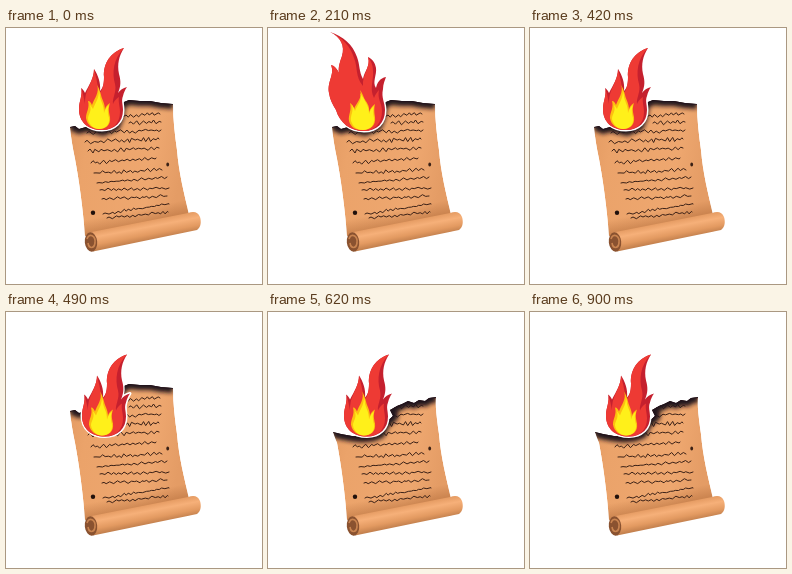
These frames come from a looping animation (256x256 px, 1.04 s). An HTML page:

```html
<!DOCTYPE html>
<html lang="en">
<head>
<meta charset="utf-8">
<title>Burning scroll</title>
<style>
html, body { margin: 0; width: 100%; height: 100%; overflow: hidden; background: #fff; }
svg { display: block; width: 100vw; height: 100vh; }
.ink { fill: none; stroke: #3a2016; stroke-width: 1; stroke-linecap: round; stroke-linejoin: round; }
.char { fill: none; stroke: #21131c; stroke-linejoin: round; }
.back { fill: #c5202e; stroke: #fff; stroke-width: 3; paint-order: stroke; stroke-linejoin: round; }
.front { fill: #ee3a34; }
.amber { fill: #fdc010; }
.yellow { fill: #fff01a; }
</style>
</head>
<body>
<svg viewBox="0 0 256 256">
  <defs>
    <linearGradient id="sheet" x1="0" y1="0" x2="1" y2="0.2">
      <stop offset="0" stop-color="#e39a62"/>
      <stop offset="0.2" stop-color="#eba36a"/>
      <stop offset="0.75" stop-color="#eea76f"/>
      <stop offset="1" stop-color="#e49c65"/>
    </linearGradient>
    <linearGradient id="roll" gradientUnits="userSpaceOnUse" x1="134" y1="194" x2="138" y2="215">
      <stop offset="0" stop-color="#e59b62"/>
      <stop offset="0.3" stop-color="#f6b079"/>
      <stop offset="0.65" stop-color="#e39a61"/>
      <stop offset="1" stop-color="#b97847"/>
    </linearGradient>
    <linearGradient id="fold" gradientUnits="userSpaceOnUse" x1="128" y1="182" x2="131" y2="197">
      <stop offset="0" stop-color="#b06a38" stop-opacity="0"/>
      <stop offset="1" stop-color="#b06a38" stop-opacity="0.55"/>
    </linearGradient>
    <filter id="soft" x="-20%" y="-60%" width="140%" height="220%"><feGaussianBlur stdDeviation="2"/></filter>
    <clipPath id="cut"><path id="cutShape"/></clipPath>
  </defs>
  <g clip-path="url(#cut)">
    <path id="paper" fill="url(#sheet)"/>
    <path d="M66 165H190V200L79 212Z" fill="url(#fold)"/>
    <g id="lines" class="ink"></g>
    <path id="smoke" class="char" filter="url(#soft)"/>
    <path id="edge" class="char"/>
  </g>
  <circle cx="87" cy="184.700" r="2.200" fill="#21110c"/>
  <ellipse cx="161.700" cy="136.500" rx="1.400" ry="2" fill="#3a2015"/>
  <path d="M83 204.500L182 185C188 183 192 184 194 189C195.500 194 195 199 191 202L87 223.500Z" fill="url(#roll)"/>
  <ellipse cx="85" cy="214" rx="6.200" ry="9.700" transform="rotate(-6 85 214)" fill="#8a5230"/>
  <path d="M81 211C83 204 90 208 89 215C88 221 83 221 82 215" fill="none" stroke="#c98450" stroke-width="1.600"/>
  <g id="flame">
    <path id="back" class="back"/>
    <path id="front" class="front"/>
    <path id="amber" class="amber"/>
    <path id="yellow" class="yellow"/>
  </g>
</svg>
<script>
const $ = id => document.getElementById(id);
const set = (id, d) => $(id).setAttribute("d", d);

// Right side, bottom and left side shared by both states of the sheet
const sides = "C167 92 169 108 171 122C173 146 178 164 183 187L79 208C77 181 73 152 69 131";
const papers = {
  whole: { top: "M64 99L69 98L73 101L80 99L97 103L109 98L113 88L114 79L118 74L123 72L134 73L144 73L155 75L167 76", end: "Q65 112 64 99Z", smoke: 10, edge: 1.5 },
  burnt: { top: "M65 120L73 122L84 124L94 125L104 124L112 121L116 112L125 104L122 98L129 94L134 92L140 89L146 91L151 88L157 89L161 86L168 85", end: "Q67 126 65 120Z", smoke: 11, edge: 2 }
};

const flames = {
  slim: {
    back: "M118 20C105 24 97 35 98 49C98 56 97 60 94 63C95 55 92 47 88 41C88 50 83 57 79 65C78 63 77 61 75 60C77 67 73 73 73 81C73 94 82 102 96 102C109 102 117 94 117 82C117 76 115 73 117 68C118 64 119 62 121 59C117 60 114 62 112 65C115 58 115 53 113 46C111 36 113 28 118 20Z",
    front: "M118 20C105 24 97 35 98 49C98 58 96 63 92 67C93 59 90 50 88 41C88 50 83 57 80 66C79 71 79 73 79 76C78 70 77 65 75 60C77 67 73 73 73 81C73 94 82 102 96 102C107 102 114 95 114 84C114 78 112 74 113 69C110 71 108 73 107 76C106 70 111 64 109 56C106 45 107 31 118 20Z",
    amber: "M91 57C94 64 88 71 86 77C85 75 84 73 82 73C84 80 80 84 80 90C81 97 87 101 93 101C100 101 105 97 104 89C103 84 102 81 104 75C101 77 99 79 99 82C99 75 96 72 95 67C94 63 93 60 91 57Z",
    yellow: "M92 60C95 68 89 75 87 81C86 79 85 78 84 77C86 84 82 86 82 91C83 97 88 101 93 101C99 101 104 97 103 90C102 85 101 82 103 77C100 79 99 82 98 85C98 77 95 74 94 69C94 66 93 63 92 60Z"
  },
  wide: {
    back: "M62 4C73 9 77 18 74 28C72 34 70 39 71 45C69 41 67 38 63 37C67 47 59 53 61 65C62 72 65 77 68 82C72 95 82 103 96 103C109 103 117 95 117 82C117 74 113 70 115 61C115 56 117 52 118 49C112 50 109 55 108 60C104 54 109 47 108 40C107 34 104 31 100 29C103 38 96 43 95 51C91 44 92 37 89 29C85 17 75 8 62 4Z",
    front: "M62 4C73 9 77 18 74 28C72 34 70 39 71 45C69 41 67 38 63 37C67 47 59 53 61 65C62 72 65 77 68 82C72 95 82 103 96 103C107 103 114 95 114 83C114 75 109 71 111 62C109 64 107 67 106 70C101 61 106 51 105 43C105 37 103 33 100 29C103 39 94 46 95 58C87 49 90 39 86 30C83 19 74 9 62 4Z",
    amber: "M92 62C95 70 88 75 86 81C85 78 84 76 82 75C84 82 80 87 81 93C83 100 88 102 95 102C103 102 108 97 107 89C106 84 106 80 107 76C104 78 102 81 101 84C102 77 98 74 96 70C95 67 94 65 92 62Z",
    yellow: "M92 65C95 72 89 77 87 83C86 80 85 78 84 77C86 83 82 88 83 93C85 99 89 102 95 102C102 102 107 97 106 90C105 85 105 82 106 78C103 80 102 83 101 86C101 78 98 76 96 71C95 69 93 67 92 65Z"
  }
};

// Each handwriting line: x1, y1, x2, y2
const rows = [
  [112, 88, 154, 86], [123, 95, 155, 94], [81, 105, 155, 102], [79, 114, 153, 111],
  [82, 123, 153, 120], [85, 135, 150, 130], [88, 145, 156, 142], [91, 155, 161, 149],
  [94, 162, 163, 160], [96, 171, 161, 168], [97, 186, 163, 176], [101, 190, 162, 184]
];

function scribble([x1, y1, x2, y2], row) {
  let seed = row * 37 + 11;
  const rand = () => (seed = (seed * 16807) % 2147483647) / 2147483647;
  for (let i = 0; i < 5; i++) rand();
  const calm = row > 6 ? 0.7 : 1;
  let d = `M${x1} ${y1}`;
  let up = 1;
  for (let x = x1 + 2; x < x2; x += 1.8 + rand() * 2.4) {
    up = -up;
    const y = y1 + (y2 - y1) * (x - x1) / (x2 - x1) + up * calm * rand() * 2.3;
    d += `L${x.toFixed(1)} ${y.toFixed(1)}`;
  }
  return `<path d="${d}L${x2} ${y2}"/>`;
}
$("lines").innerHTML = rows.map(scribble).join("");

function showPaper(name) {
  const { top, end, smoke, edge } = papers[name];
  const shape = top + sides + end;
  set("cutShape", shape);
  set("paper", shape);
  set("smoke", top);
  set("edge", top);
  $("smoke").setAttribute("stroke-width", smoke);
  $("edge").setAttribute("stroke-width", edge);
}

function showFlame(name, low) {
  for (const part of ["back", "front", "amber", "yellow"]) set(part, flames[name][part]);
  $("flame").setAttribute("transform", low ? "translate(3 22.500)" : "");
}

const LOOP = 1040, BEAT = 70, DROP = 490, BURN = 520, FLICKER = 550, REST = 900;

function draw(t) {
  const low = t >= DROP;
  const wide = low
    ? t >= FLICKER && t < REST && Math.floor((t - FLICKER) / BEAT) % 2 === 0
    : Math.floor(t / BEAT) % 2 === 1;
  showPaper(t < BURN ? "whole" : "burnt");
  showFlame(wide ? "wide" : "slim", low);
}

function tick(now) {
  draw(now % LOOP);
  requestAnimationFrame(tick);
}
draw(0);
requestAnimationFrame(tick);
</script>
</body>
</html>
```
